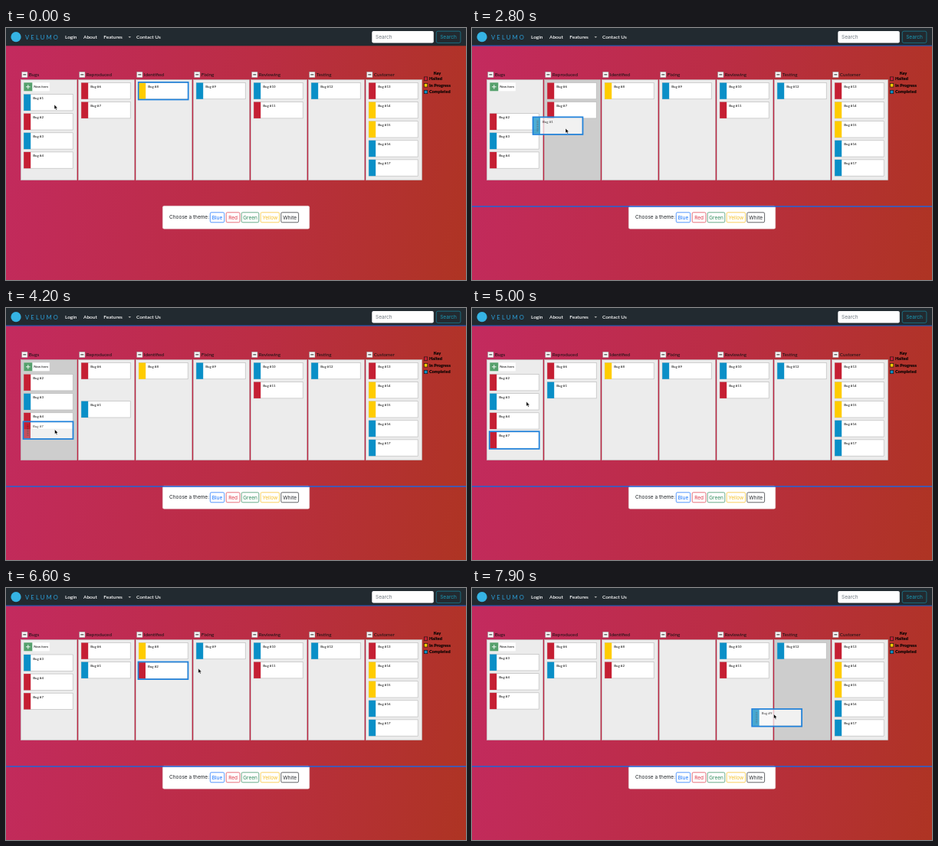
These frames come from a looping animation (600x329 px, 8000 ms). An HTML page:

```html
<!DOCTYPE html>
<html lang="en">
<head>
<meta charset="utf-8">
<title>Bug board</title>
<style>
  html, body { margin: 0; width: 100%; height: 100%; overflow: hidden; }
  body { background: linear-gradient(100deg, #c32a5f, #bb2d45 50%, #ae3423); }
  svg { display: block; width: 100vw; height: 100vh; }
  text { font-family: Lato, sans-serif; white-space: pre; }
  .ui { font-family: Inter, Roboto, sans-serif; font-size: 6.5px; }
  .nav { font-weight: 600; fill: #fff; }
  .head { font-size: 6.3px; fill: #111; }
  .small { font-size: 4.4px; font-weight: 500; fill: #111; }
  .key { font-size: 5.6px; font-weight: 900; }
  .mid { text-anchor: middle; }
</style>
</head>
<body>
<svg viewBox="0 0 600 329" preserveAspectRatio="none">
  <rect width="600" height="23.3" fill="#222a30"/>
  <circle cx="13" cy="11.7" r="6.6" fill="#35b4e4"/>
  <text x="25" y="14.6" font-size="7.6" letter-spacing="2.2" fill="#2b9fd9">VELUMO</text>
  <g class="ui nav">
    <text x="77" y="14.2">Login</text>
    <text x="101" y="14.2">About</text>
    <text x="127.3" y="14.2">Features</text>
    <path d="M159.5 11h3.6l-1.8 1.9z" fill="#aaa"/>
    <text x="170" y="14.2">Contact Us</text>
  </g>
  <rect x="477.3" y="4" width="80.5" height="15.6" rx="2" fill="#fff"/>
  <text class="ui" x="482" y="14.2" fill="#6c757d">Search</text>
  <rect x="561.3" y="4.2" width="31.6" height="15.2" rx="2" fill="none" stroke="#1787a0" stroke-width=".7"/>
  <text class="ui mid" x="577" y="14.2" fill="#1a9bb8">Search</text>

  <g id="board"></g>
  <g id="legend"><text class="key mid" x="562.5" y="60.6" font-size="6.5">Key</text></g>

  <rect x="204.3" y="232.3" width="191.5" height="30" rx="2" fill="#fff" stroke="#d9c0c4" stroke-width=".5"/>
  <text class="ui" x="213" y="248.7" fill="#212529">Choose a theme:</text>
  <g id="themes"></g>
  <g id="focus" fill="#2b62cf">
    <rect y="22.6" width="600" height="1"/>
    <rect y="232.2" width="600" height="1.6"/>
  </g>
  <g id="cards"></g>
  <path id="cursor" d="M0 0v6.1l1.4-1.2 1 2.2 1.1-.5-1-2.1h1.9z" fill="#000" stroke="#fff" stroke-width=".5"/>
</svg>
<script>
const LOOP = 8000, STEP = 100, SETTLE = 400;
const RED = '#c51f33', YELLOW = '#ffcc00', BLUE = '#0a8fc7', SELECT = '#1f82dc';
const $ = id => document.getElementById(id);

function add(parent, tag, attrs, label) {
  const el = document.createElementNS('http://www.w3.org/2000/svg', tag);
  for (const k in attrs) el.setAttribute(k, attrs[k]);
  if (label) el.textContent = label;
  return parent.appendChild(el);
}
const rect = (parent, x, y, width, height, fill, more) =>
  add(parent, 'rect', { x, y, width, height, fill, ...more });
const show = (el, on) => el.setAttribute('visibility', on ? 'visible' : 'hidden');
const colX = i => 19 + 75 * i;

// Board columns
const names = ['Bugs', 'Reproduced', 'Identified', 'Fixing', 'Reviewing', 'Testing', 'Customer'];
const board = $('board');
rect(board, 92, 67, 378, 132, '#c02240');
const panels = names.map((name, i) => {
  const x = colX(i);
  rect(board, x + 1.6, 57.2, 7.4, 7.4, '#f6f6f6', { stroke: '#888', 'stroke-width': .4 });
  rect(board, x + 3.3, 60.4, 4, 1, '#222');
  add(board, 'text', { class: 'head', x: x + 10.8, y: 63.3 }, name);
  return rect(board, x + .3, 67.6, 73.2, 131, '#ececec', { stroke: '#bdbdbd', 'stroke-width': .6 });
});
rect(board, 23.3, 71.3, 33.5, 11, '#fff');
rect(board, 23.3, 71.3, 11, 11, '#55a06c');
add(board, 'path', { d: 'M28.8 74v5.6M26 76.8h5.6', stroke: '#fff', 'stroke-width': .9 });
add(board, 'text', { class: 'small', x: 36.2, y: 78.4 }, 'New item');

[['Halted', RED], ['In Progress', YELLOW], ['Completed', BLUE]].forEach(([name, fill], i) => {
  const y = 63.9 + 8.7 * i;
  rect($('legend'), 545.4, y, 4.4, 4.4, fill, { stroke: '#111', 'stroke-width': .6 });
  add($('legend'), 'text', { class: 'key', x: 552, y: y + 4 }, name);
});

const themes = [['Blue', 266.3, 18.4, '#0d6efd'], ['Red', 287.2, 17.8, '#dc3545'],
  ['Green', 307.2, 22.6, '#2f8a5b'], ['Yellow', 332.2, 24.4, '#f5bd20'], ['White', 358.8, 22.8, '#212529']];
const buttons = themes.map(([name, x, w, color]) => {
  const box = rect($('themes'), x, 240.8, w, 13, '#fff', { rx: 1.6, stroke: color, 'stroke-width': .7 });
  add($('themes'), 'text', { class: 'ui mid', x: x + w / 2, y: 249.6, fill: color }, name);
  return box;
});
const ring = rect($('themes'), 286.3, 239.9, 19.6, 14.8, 'none', { rx: 2.2, stroke: '#e8808b', 'stroke-width': 1.2 });

// Cards
const start = [[1, 2, 3, 4], [6, 7], [8], [9], [10, 11], [12], [13, 14, 15, 16, 17]];
const reds = [2, 4, 6, 7, 11, 13], yellows = [8, 14, 15];
const colorOf = id => reds.includes(id) ? RED : yellows.includes(id) ? YELLOW : BLUE;
const cards = {};
start.flat().forEach(id => {
  const g = add($('cards'), 'g', {});
  const body = add(g, 'g', {});
  rect(body, 0, 0, 64, 21.3, '#fff', { stroke: '#b5b5b5', 'stroke-width': .6 });
  rect(body, 0, 0, 9, 21.3, colorOf(id));
  add(body, 'text', { class: 'small', x: 12, y: 6.6 }, 'Bug #' + id);
  const grip = add(body, 'path', { d: 'M5.5 3.5v15', stroke: '#222', 'stroke-width': 2.4, 'stroke-dasharray': '.7 .8', opacity: .6 });
  const frame = rect(g, -.5, -.7, 65, 22.7, 'none', { stroke: SELECT, 'stroke-width': 1.7 });
  cards[id] = { g, body, grip, frame };
});

// Drags: path points are [time, card x, card y]; grab is the pointer's x in the card
const drags = [
  { id: 1, to: 1, grab: 33, path: [[2200, 23, 86.5], [2800, 80, 117], [3200, 100, 128]] },
  { id: 7, to: 0, grab: 41, path: [[3700, 98, 96.5], [4200, 23, 149], [4500, 23, 152]] },
  { id: 2, to: 2, grab: 52, path: [[5300, 23, 86.5], [5900, 119.5, 124], [6300, 158, 130]] },
  { id: 9, to: 5, grab: 30, path: [[6800, 248, 71.5], [7300, 303, 114], [7700, 367, 160], [8000, 365, 158]] }
];
const pointer = [[0, 63, 100], [1900, 56, 95], [2200, 56, 95], [2800, 122, 131], [3200, 131, 138],
  [3700, 139, 108], [4200, 63.5, 158.5], [4500, 64, 164], [5300, 75, 97], [5900, 207.5, 143.5],
  [6300, 210, 141], [6800, 278, 81], [7300, 409, 182], [7600, 405, 179], [7900, 393.5, 164.5], [8000, 394, 165]];

function along(path, t) {
  let i = 1;
  while (i < path.length - 1 && path[i][0] < t) i++;
  const [a, b] = [path[i - 1], path[i]];
  const u = Math.min(1, Math.max(0, (t - a[0]) / (b[0] - a[0])));
  return mix(a.slice(1), b.slice(1), u);
}
const mix = (a, b, u) => a.map((v, i) => v + (b[i] - v) * u);

function layout(columns) {
  const spots = {};
  columns.forEach((ids, c) => ids.forEach((id, r) => {
    spots[id] = [colX(c) + 4.2, (c ? 71.5 : 86.6) + 25.1 * r];
  }));
  return spots;
}

let columns = start;
const layouts = [layout(columns)];
for (const d of drags) {
  columns = columns.map((ids, c) => {
    const rest = ids.filter(id => id !== d.id);
    return c === d.to ? [...rest, d.id] : rest;
  });
  d.begin = d.path[0][0];
  d.end = d.path.at(-1)[0];
  layouts.push(layout(columns));
}

function draw(t) {
  const done = drags.filter(d => t >= d.end).length;
  const live = drags.find(d => t >= d.begin && t < d.end);
  const picked = drags.filter(d => t >= d.begin).pop();
  const selected = picked ? picked.id : 8;
  const last = drags[done - 1];
  const u = last ? Math.min(1, (t - last.end) / SETTLE) : 1;
  const ease = 1 - (1 - u) ** 3;
  let hover = -1;

  for (const key in cards) {
    const id = +key, { g, body, grip, frame } = cards[id];
    let pos = layouts[done][id];
    if (last) {
      const from = id === last.id ? last.path.at(-1).slice(1) : layouts[done - 1][id];
      pos = mix(from, pos, ease);
    }
    const held = live && live.id === id;
    if (held) {
      pos = along(live.path, t);
      hover = Math.floor((pos[0] + live.grab - 19) / 75);
    }
    g.setAttribute('transform', `translate(${pos})`);
    body.setAttribute('opacity', held ? .72 : 1);
    show(grip, held);
    show(frame, id === selected);
  }
  if (cards[selected].g.nextSibling) $('cards').append(cards[selected].g);

  panels.forEach((p, i) => p.setAttribute('fill', i === hover ? '#cdcdcd' : '#ececec'));
  const pressed = t >= 1000 && !picked;
  show(ring, pressed);
  buttons[1].setAttribute('stroke-width', pressed ? 1.2 : .7);
  show($('focus'), !!picked);
  $('cursor').setAttribute('transform', `translate(${along(pointer, t)})`);
}

const origin = performance.now();
function tick() {
  const t = (performance.now() - origin) % LOOP;
  draw(Math.floor(t / STEP) * STEP);
  requestAnimationFrame(tick);
}
tick();
</script>
</body>
</html>
```
